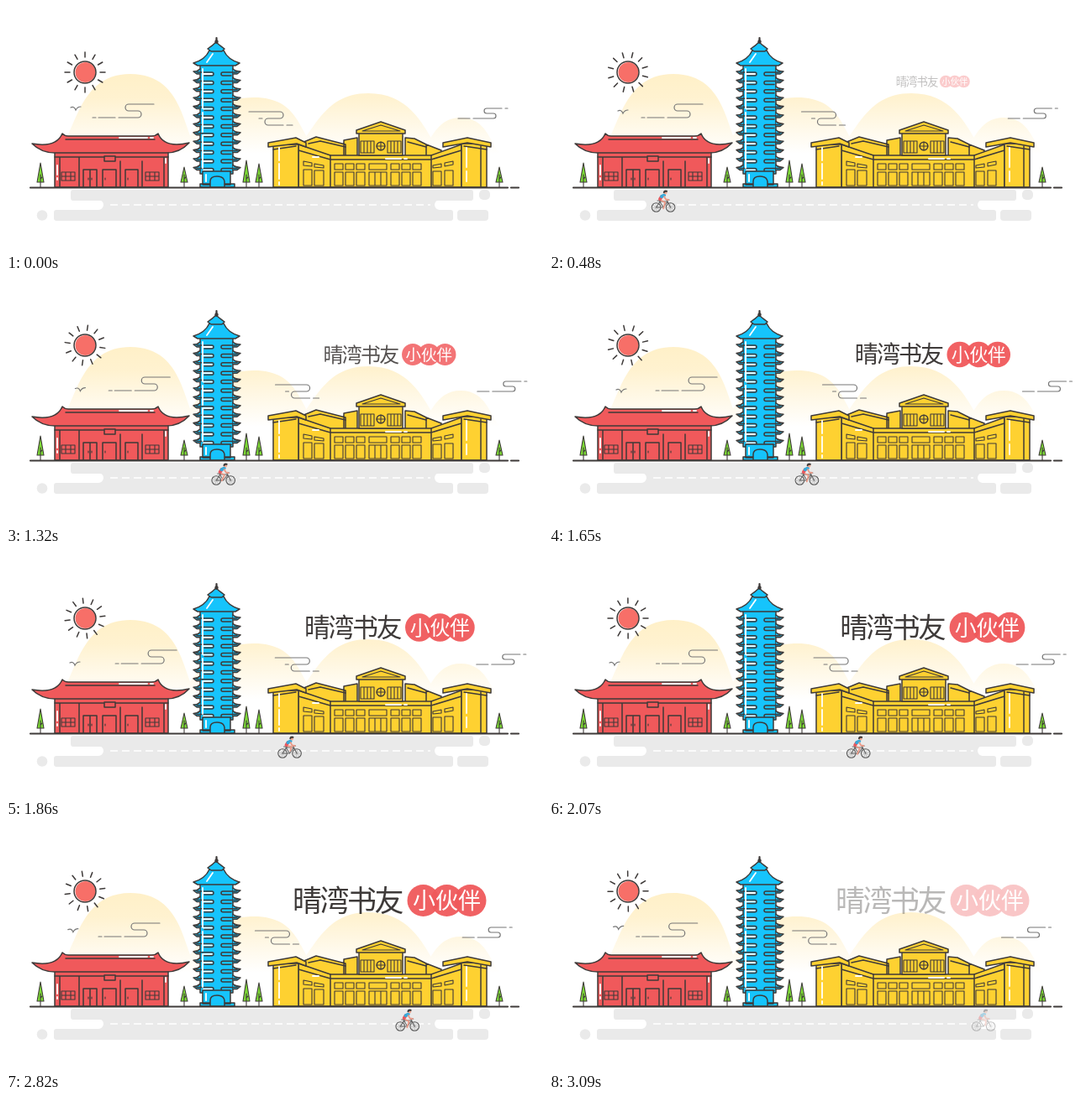
An HTML page that plays this animation: 639x292 px, repeating every 3.12 s.

```html
<!DOCTYPE html>
<html lang="zh">
<head>
<meta charset="utf-8">
<style>
html, body { margin: 0; width: 100%; height: 100%; overflow: hidden; background: #fff; }
svg { display: block; width: 639px; height: 292px; }
text { font-family: "Noto Sans CJK SC", "Noto Sans CJK", sans-serif; text-anchor: middle; font-weight: 500; }
.ink { stroke: #3e3a39; stroke-width: 1.5; stroke-linejoin: round; stroke-linecap: round; fill: none; }
.bold { stroke-width: 2.2; }
.fine { stroke-width: 1.1; }
.red { fill: #f0595b; }
.cyan { fill: #16c4fc; }
.gold { fill: #fed131; }
.leaf { fill: #7ddb35; }
.cloud { stroke: #777; stroke-width: 1.2; fill: none; stroke-linecap: round; }
.shine { stroke: #fff; stroke-width: 1.8; fill: none; stroke-linecap: round; }
.road { fill: #eaeaea; }
.spoke { stroke: #aaa; stroke-width: .6; }
.skin { stroke: #e99a88; stroke-width: 1.8; }
.shirt { stroke: #36a9da; stroke-width: 4; }
.shorts { stroke: #e5575d; stroke-width: 4; }
</style>
</head>
<body>
<svg viewBox="0 0 639 292">
  <defs>
    <linearGradient id="haze" gradientUnits="userSpaceOnUse" x1="0" y1="81" x2="0" y2="176">
      <stop offset="0" stop-color="#fff0c8"/>
      <stop offset=".3" stop-color="#fff2d0"/>
      <stop offset="1" stop-color="#fff"/>
    </linearGradient>
  </defs>

  <g fill="url(#haze)">
    <path d="M56 176C84 164 80 81 148 81S210 160 232 176Z"/>
    <path d="M200 176C230 148 240 109 295 109S348 152 372 176Z"/>
    <path d="M336 180C366 156 374 104 431 104S501 155 520 180Z"/>
    <path d="M490 176C505 166 510 133 541 133S576 164 588 176Z"/>
  </g>

  <g id="sun">
    <circle cx="94.500" cy="79" r="12" fill="#f76f68"/>
    <circle class="ink" cx="94" cy="79" r="13"/>
    <g id="rays" class="ink"></g>
  </g>
  <path id="bird" class="cloud" d="M-6-1Q-2-3 0 2Q2-2 6-2"/>

  <g class="cloud">
    <path id="c0" d="M176 117H146a4 4 0 0 0 0 8H157a4 4 0 0 1 0 8H134M130 133H110M107 133H103"/>
    <path id="c1" d="M289 126H326a4 4 0 0 1 0 8H312a4 4 0 0 0 0 8H330M334 142H341M305 134H301"/>
    <path id="c2" d="M597 122H594M590 122H572a3 3 0 0 0 0 6H580a3 3 0 0 1 0 6H556M552 134H538"/>
  </g>

  <!-- road -->
  <g class="road">
    <rect x="77" y="219" width="479" height="13" rx="3"/>
    <rect x="563" y="219" width="13" height="12" rx="5"/>
    <path d="M110 231H516a6 6 0 0 0 0 12H110a6 6 0 0 0 0-12Z"/>
    <rect x="57" y="243" width="475" height="13" rx="3"/>
    <rect x="537" y="243" width="37" height="13" rx="4"/>
    <circle cx="43" cy="249.500" r="6.300"/>
  </g>
  <path d="M124 237H505" stroke="#fff" stroke-width="1.600" stroke-dasharray="9 5"/>

  <!-- hall -->
  <g class="ink">
    <path class="red" d="M58 174H193V216H58Z"/>
    <path class="red" d="M67 152Q70 155 74 155H173Q178 155 181 152Q188 170 218 163Q207 175 191 175H58Q42 175 31 164Q60 169 67 152Z"/>
    <path d="M71 159H177M58 180H193M64 180V215M87 180V215M136 185V215M162 185V215M188 180V215"/>
    <path class="red" d="M117 179H130V185H117Z"/>
    <path class="fine" d="M66 198H82V208H66ZM71 198V208M77 198V208M66 203H82M166 198H182V208H166ZM171 198V208M177 198V208M166 203H182"/>
    <path d="M92 216V195H108V216M100 195V216M115 216V195H131V216M142 216V195H157V216"/>
    <path class="fine" d="M98 205V207M102 205V207M118 205V207M145 205V207"/>
  </g>
  <path class="shine" d="M135 157H168M172 157H175M190 182V187M61 190V201M61 205V207"/>

  <!-- pagoda -->
  <g class="ink">
    <path class="cyan" d="M231 70H270V200H231Z"/>
    <g id="tiers"></g>
    <path class="cyan" d="M242 53H259Q264 64 278 68L273 71H228L223 68Q237 64 242 53Z"/>
    <path class="cyan" d="M250 43Q254 47 260 51L257 54H244L240 51Q246 47 250 43Z"/>
    <path class="bold" d="M250.500 38V44"/>
    <circle cx="250.500" cy="42.500" r="1.500" fill="#3e3a39"/>
    <path class="cyan" d="M234 197H267V213H234ZM231 212H272V216H231Z"/>
    <path class="cyan" d="M243 216V209Q243 203 251 203T260 209V216Z"/>
  </g>
  <path class="shine" d="M246 57L239 67M234 75V122M234 127V150M234 154V193M238 201V209"/>

  <!-- library -->
  <g class="ink">
    <path class="gold" d="M352 163L369 156L404 165V180H352ZM402 160L418 157V180H402ZM475 157L486 158L500 165V180H475ZM500 165L518 172V180H500Z"/>
    <path class="gold" d="M348 165L386 178H506L542 165V216H348Z"/>
    <path class="gold" d="M420 151H472V178H420Z"/>
    <path class="gold" d="M417 152V148L446 138L475 148V152Z"/>
    <path class="fine" d="M424 149L446 142L469 149Z"/>
    <circle cx="446" cy="167" r="4.800"/>
    <path class="fine" d="M441 167H451M446 162V172"/>
    <path class="fine" d="M422 161H438V175H422ZM426 161V175M430 161V175M434 161V175M454 161H470V175H454ZM458 161V175M462 161V175M466 161V175"/>
    <path d="M348 172L386 183H506L542 172M386 178V216M506 178V216"/>
    <path class="gold" d="M318 165H348V216H318ZM542 164H572V216H542Z"/>
    <path d="M565 167V215"/>
    <path class="gold" d="M312 163L345 157L357 163V168L346 164L312 168ZM520 163L549 157L577 163V168L549 163L520 168Z"/>
    <path d="M318 171L345 167M545 167L572 171M360 164L374 161L404 168M478 162L500 168"/>
    <path class="fine" d="M354 195H364V214H354ZM367 196H378V214H367ZM354 185L364 187V191L354 190ZM367 188L378 190V193L367 192ZM508 197H518V214H508ZM522 196H532V214H522ZM508 190L518 188V192L508 193ZM522 187L532 185V189L522 191Z"/>
    <g id="panes" class="fine"></g>
    <path class="fine" d="M432 198H453V214H432ZM439 198V214M446 198V214M432 188H453V195H432Z"/>
  </g>
  <path class="shine" d="M325 169V184M325 188V206M325 210V213M548 169V192M548 197V209M452 182H470M474 182H477M365 180H372"/>

  <g id="trees" class="ink fine"></g>
  <path class="ink bold" d="M29 216.500H597M601 216.500H610"/>

  <!-- cyclist -->
  <g id="bike" class="ink fine">
    <g id="wheels"></g>
    <path stroke="#666" d="M-8.500 240L-4 233H5L0 240H-8.500M-5 232L0 240M8.500 240L4 231H7M-7 232H-3"/>
    <path id="leg" class="skin"/>
    <path class="shorts" d="M-4 230L-2 227"/>
    <path class="shirt" d="M-2 227L1 225.500"/>
    <path class="skin" d="M1 227L3 230.500L6 231"/>
    <circle cx="2.500" cy="222.500" r="2" fill="#efaa95" stroke="none"/>
    <path class="bold" d="M.8 222Q1.500 220 3.800 220.800"/>
  </g>

  <g id="title">
    <text x="-51" y="13" font-size="35" letter-spacing="-2.500" fill="#3e3a39">晴湾书友</text>
    <g fill="#f0595b" fill-opacity=".95">
      <circle cx="39.500" r="19"/><circle cx="67.500" r="19"/><circle cx="95.500" r="19"/>
    </g>
    <text x="67.500" y="10" font-size="27" fill="#fff">小伙伴</text>
  </g>
</svg>
<script>
const LOOP = 3120, STEP = 30;
const $ = id => document.getElementById(id);
const range = n => [...Array(n).keys()];
const clamp = v => Math.max(0, Math.min(1, v));
const place = (id, x, y, extra = '') => $(id).setAttribute('transform', `translate(${x} ${y}) ${extra}`);
const fill = (id, items) => $(id).innerHTML = items.join('');

fill('rays', range(12).map(i =>
  `<path d="M94 61V55" transform="rotate(${i * 30} 94 79)"/>`));

// Upturned eaves with a rounded notch on each side of the middle.
fill('tiers', range(12).map(i => `<g transform="translate(0 ${79 + i * 10.4})">
  <path class="shine" d="M235 2H245"/>
  <path class="cyan" d="M231-4Q228-1 223-1L227 2H231M270-4Q273-1 279-1L275 2H270"/>
  <path d="M227 0H245a2 2 0 0 1 0 4H236M275 0H258a2 2 0 0 0 0 4H268"/></g>`));

fill('panes', [391, 404, 417, 458, 471, 484].map(x =>
  `<path d="M${x} 198h10v16h-10ZM${x} 188h10v7h-10Z"/>`));

fill('trees', [[41, 187], [212, 192], [286, 184], [301, 188], [587, 192]].map(([x, top]) =>
  `<path class="leaf" d="M${x} ${top}L${x + 4} 210H${x - 4}Z"/>
   <path d="M${x} 201V216M${x} 206l2-2"/>`));

fill('wheels', [-8.5, 8.5].map(x =>
  `<g transform="translate(${x} 240)"><circle r="5.300" stroke="#555"/>
   <path class="spoke" d="M-5 0H5M0-5V5M-3.500-3.500L3.500 3.500M-3.500 3.500L3.500-3.500"/></g>`));
const spokes = document.querySelectorAll('.spoke');

const flight = [[0, 83, 122], [480, 88, 126], [960, 91, 130], [1650, 86, 133],
  [2070, 78, 133], [2460, 76, 130], [LOOP, 83, 122]];
// Furthest drift of each cloud and the time it turns back.
const drifts = [[28, 1920], [38, 1590], [27, 1560]];

function along(keys, t) {
  const i = keys.findIndex(k => k[0] > t);
  const [a, b] = [keys[i - 1], keys[i]];
  const p = (t - a[0]) / (b[0] - a[0]);
  return [1, 2].map(n => a[n] + (b[n] - a[n]) * p);
}

function draw(t) {
  drifts.forEach(([reach, turn], i) =>
    place('c' + i, reach * Math.min(t / turn, (LOOP - t) / (LOOP - turn)), 0));
  place('bird', ...along(flight, t));
  $('rays').setAttribute('transform', `rotate(${90 * t / LOOP} 94 79)`);

  const leave = 1 - clamp((t - 3000) / 140);
  place('title', 457, 90, `scale(${Math.min(1, 0.21 + 0.00036 * t)})`);
  $('title').setAttribute('opacity', Math.min(clamp(t / 1500), leave));

  const ride = 0.146 * t;
  place('bike', 66 + ride, 0);
  $('bike').setAttribute('opacity', Math.min(clamp(t / 300), leave));
  spokes.forEach(s => s.setAttribute('transform', `rotate(${ride / 5.3 * 180 / Math.PI})`));
  const a = ride / 9, px = 2.3 * Math.cos(a), py = 239 + 2.3 * Math.sin(a);
  $('leg').setAttribute('d', `M-4 231L${2 + px / 3} ${233 + (py - 239) / 2}L${px} ${py}`);
}

const start = performance.now();
function tick() {
  const t = (performance.now() - start) % LOOP;
  draw(Math.floor(t / STEP) * STEP);
  requestAnimationFrame(tick);
}
tick();
</script>
</body>
</html>
```
